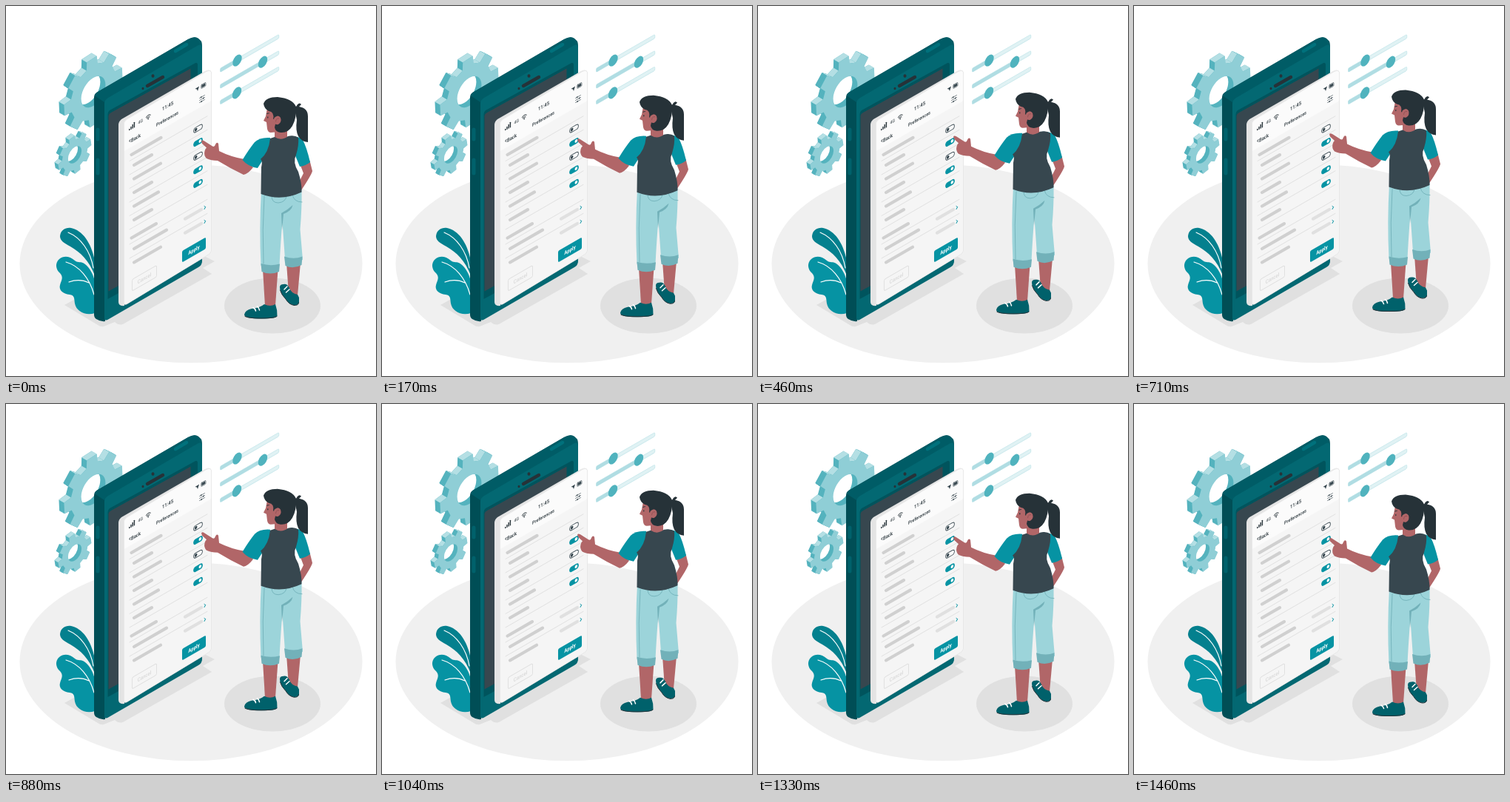
An HTML page with a canvas for the animation above (1500 ms loop, 500 px wide and 500 px high).

```html
<!DOCTYPE html>
<html lang="en">
<head>
<meta charset="utf-8">
<title>Preferences</title>
<style>
html, body { margin: 0; width: 100%; height: 100%; overflow: hidden; background: #fff; }
canvas { display: block; width: 500px; height: 500px; }
</style>
</head>
<body>
<canvas id="stage" width="500" height="500"></canvas>
<script>
const LOOP = 1500, LIFT = 10;
const TEAL = '#0693a3', DEEP = '#036872', DARK = '#37474f', INK = '#263238';
const SKIN = '#b16668', PALE = '#9cd4da', FOLD = '#72b1b9', SHOE = '#00616b';
const stage = document.getElementById('stage').getContext('2d');
const backdrop = document.createElement('canvas');
backdrop.width = backdrop.height = 500;
let ctx = backdrop.getContext('2d');

function fill(color, d) {
  ctx.fillStyle = color;
  ctx.fill(new Path2D(d));
}

function stroke(color, width, d) {
  ctx.strokeStyle = color;
  ctx.lineWidth = width;
  ctx.lineCap = ctx.lineJoin = 'round';
  ctx.stroke(new Path2D(d));
}

function oval(color, x, y, rx, ry) {
  ctx.fillStyle = color;
  ctx.beginPath();
  ctx.ellipse(x, y, rx, ry, 0, 0, 7);
  ctx.fill();
}

// Draws in the plane of the phone's front, with the origin at x, y.
function iso(x, y, draw) {
  ctx.save();
  ctx.transform(0.866, -0.5, 0, 1, x, y);
  draw();
  ctx.restore();
}

function box(x, y, w, h, r) {
  ctx.beginPath();
  ctx.roundRect(x, y, w, h, r);
}

function label(text, x, y, size, color, weight = 700) {
  iso(x, y, () => {
    ctx.font = `${weight} ${size}px Roboto, sans-serif`;
    ctx.textAlign = 'center';
    ctx.textBaseline = 'middle';
    ctx.fillStyle = color;
    ctx.fillText(text, 0, 0.4);
  });
}

// Height on the panel at x for a row that meets x = 160 at the given level.
const rowY = (x, level) => level - 0.5774 * (x - 160);

function bar(x0, x1, level, width, color) {
  stroke(color, width, `M${x0} ${rowY(x0, level)}L${x1} ${rowY(x1, level)}`);
}

function gear(x, y, radius, hole, turn, depth) {
  const points = [], root = radius * 0.77;
  for (let i = 0; i < 8; i++) {
    const mid = (turn + 45 * i) * Math.PI / 180;
    for (const [da, r] of [[-0.25, root], [-0.17, radius], [0.17, radius], [0.25, root]])
      points.push([Math.cos(mid + da) * r, Math.sin(mid + da) * r]);
  }
  const shape = new Path2D(`M${points.join('L')}Z`);
  shape.moveTo(hole, 0);
  shape.arc(0, 0, hole, 0, 7);
  const layer = (shift, color) => iso(x - shift, y - shift * 0.577, () => {
    ctx.fillStyle = color;
    ctx.fill(shape, 'evenodd');
  });
  for (let s = depth; s > 0; s -= 0.5) layer(s, '#55b3be');
  // Edges facing upwards catch the light.
  iso(x, y, () => points.forEach(([ax, ay], i) => {
    const [bx, by] = points[(i + 1) % points.length], d = depth * 1.155;
    if (bx - ax > Math.abs(by - ay))
      fill('#b4dfe4', `M${ax} ${ay}L${bx} ${by}l${-d} ${-d}L${ax - d} ${ay - d}Z`);
  }));
  layer(0, '#8fced6');
}

function drawSliders() {
  [[86, 312.5], [108, 347], [129.5, 312]].forEach(([y, knob]) => {
    const reach = (knob - 289.5) / 0.866;
    iso(289.5, y + 0.8, () => {
      box(0, -2.6, 91.5, 5.2, 1.5);
      ctx.fillStyle = '#e0f2f4';
      ctx.fill();
      ctx.strokeStyle = '#bfe4e8';
      ctx.lineWidth = 0.7;
      ctx.stroke();
      box(0, -2.6, reach, 5.2, 1.5);
      ctx.fillStyle = '#b0dde3';
      ctx.fill();
      oval('#50b3be', reach, 0, 7.2, 7.2);
    });
  });
}

function drawLeaves() {
  fill('#04808e', 'M73 311C74 302 81 299 88 300C103 303 115 319 120 344V364C112 344 101 333 87 325C78 320 73 317 73 311Z');
  fill(TEAL, 'M120 415C108 419 95 413 93 402C92 395 93 391 86 390C77 389 71 384 73 377C75 370 78 367 73 361C67 356 66 347 72 342C78 337 86 338 93 344C98 348 101 344 107 349C114 355 118 363 120 372Z');
  stroke('#fff', 1.2, 'M84 306C101 313 114 331 118 354');
  stroke('#fff', 1.2, 'M81 346C99 351 113 368 119 390M85 373C96 369 106 371 112 374');
}

function drawPhone() {
  fill('#004e56', 'M119 124Q119 119 124 116L246 45Q255 40 260 44L264 48Q265 50 265 60L134 129V426Q128 427 122 423Q119 421 119 417Z');
  fill('#005c66', 'M119.500 121Q120 118 124 116L246 45Q255 40 260 44L264 48L265 58L133 130Z');
  fill(DEEP, 'M133 132Q133 127 138 124L258 54Q265 50 265 57V345Q265 350 260 353L139 423Q133 427 133 421Z');
  stroke('#00717c', 4.5, 'M229 61L244 52');
  stroke('#00616b', 5, 'M124 167V180M124 208V226');
  fill('#00545d', 'M137.500 146Q137.500 143 140 141L256 77Q259 76 259 80V330L137.500 396Z');
  fill(DARK, 'M138.500 150Q138 146 142 144L249.500 84.500V325L138.500 385.500Z');
  stroke(INK, 4.4, 'M191 108L212 96');
  oval(INK, 198.5, 94.5, 2, 2.3);
  oval(INK, 185, 111.5, 1.5, 1.8);
}

function drawStatus() {
  for (let i = 0; i < 4; i++) {
    const x = 166.8 + i * 2.2, base = rowY(x, 171.5);
    stroke(INK, 1.4, `M${x} ${base}V${base - 1 - i * 1.8}`);
  }
  label('4G', 181.7, 156, 6, INK, 400);
  iso(192.3, 151, () => {
    stroke(INK, 0.9, 'M-3.500 -2Q0 -5 3.500 -2M-2 0Q0 -2 2 0');
    oval(INK, 0, 1.5, 0.9, 0.9);
  });
  label('11:45', 218.5, 135, 6.8, INK, 500);
  fill(DARK, 'M255.500 112L261 108.500L259 115L258 112.500Z');
  iso(267, 107.300, () => {
    ctx.strokeStyle = DARK;
    ctx.lineWidth = 0.6;
    box(-3.8, -2.5, 7.2, 5, 1);
    ctx.stroke();
    ctx.fillStyle = DARK;
    ctx.fillRect(-3, -1.7, 5.5, 3.4);
  });
  iso(265, 125.5, () => {
    stroke(DARK, 0.6, 'M-4 -3H4M-4 0H4M-4 3H4');
    for (const [x, y] of [[-1.5, -3], [2, 0], [-1, 3]]) oval(DARK, x, y, 1, 1);
  });
  label('Preferences', 218, 152.300, 6.4, INK, 500);
  label('Back', 175.500, 178, 6.8, INK, 500);
  stroke(INK, 0.8, 'M168 180.500L166.600 182.800L168 183.200');
}

function drawToggle(y, on) {
  iso(259.5, y, () => {
    box(-6.8, -3.2, 13.6, 6.4, 3.2);
    ctx.fillStyle = on ? TEAL : '#fafafa';
    ctx.fill();
    ctx.strokeStyle = on ? TEAL : DARK;
    ctx.lineWidth = 0.9;
    ctx.stroke();
    oval(on ? '#fff' : DARK, on ? 3.3 : -3.3, 0, 2.1, 2.1);
  });
}

function drawButton(text, x, y, w, color, textColor, solid) {
  iso(x, y, () => {
    box(-w / 2, -7.7, w, 15.4, 2);
    ctx.fillStyle = ctx.strokeStyle = color;
    ctx.lineWidth = 1;
    solid ? ctx.fill() : ctx.stroke();
  });
  label(text, x, y, 7, textColor, solid ? 700 : 500);
}

function drawPanel() {
  fill('#e4e4e4', 'M152 161Q152 156 156 153L269 88Q274 85 277 88L160 158V405Q152 406 152 400Z');
  const front = new Path2D('M159 160Q159 156 163 153L271 88Q278 85 278 92V329Q278 333 274 336L165 402Q159 406 159 400Z');
  ctx.fillStyle = '#f5f5f5';
  ctx.fill(front);
  ctx.save();
  ctx.clip(front);
  fill('#fbfbfb', `M159 140V${rowY(159, 196)}L279 ${rowY(279, 196)}V80Z`);
  ctx.strokeStyle = '#e3e3e3';
  ctx.lineWidth = 1.4;
  ctx.stroke(front);
  ctx.restore();
  drawStatus();

  for (const level of [213.5, 232, 250.5, 269, 287.5, 306, 326, 345])
    bar(167, 272, level, 0.9, '#dedede');
  bar(169.5, 209.5, 206.5, 4.2, '#d0d0d0');
  bar(169.5, 203, 319, 4.2, '#d0d0d0');
  [[197, 222.5], [209, 241], [197, 259.5], [206, 278], [197, 296.5], [217, 335.5], [209, 354]]
    .forEach(([end, level]) => bar(173, end, level, 4.2, '#d0d0d0'));
  [0, 1, 0, 1, 1].forEach((on, i) => drawToggle(165.5 + i * 18.6, on));
  for (const level of [335, 354]) {
    bar(242, 264, level, 4.2, '#e0e0e0');
    const y = rowY(269, level);
    stroke(TEAL, 1, `M268 ${y - 1.5}L269.700 ${y - 0.5}L268 ${y + 2.5}`);
  }
  drawButton('Apply', 254, 329.5, 37, TEAL, '#fff', true);
  drawButton('Cancel', 187, 367.800, 38, '#dedede', '#d8d8d8', false);
}

function drawBackdrop() {
  ctx.fillStyle = '#fff';
  ctx.fillRect(0, 0, 500, 500);
  oval('#f0f0f0', 250, 348.3, 231.5, 134);
  fill('#e0e0e0', 'M79 404L119 382L264 310V336L282 345L266 354L278 362L158 430Q152 432 147 427L132 433Q128 434 124 431Z');
  oval('#e0e0e0', 360, 405, 65, 37.5);
  drawSliders();
  gear(118, 116, 46, 19, -3, 7);
  gear(93, 201, 26, 10.5, -10, 5);
  drawLeaves();
  drawPhone();
  drawPanel();
}

function drawLegs() {
  fill(SKIN, 'M379 347H398L394 391Q388 395 382 389Z');
  fill(SHOE, 'M370 380Q370 376 375 376Q380 375 383 381Q385 388 394 390L396 394V401Q395 405 388 404Q382 403 378 396Q370 388 370 380Z');
  stroke(INK, 1, 'M370.500 384Q372 390 378 396Q382 403 389 404.500Q395 405 395.500 401');
  stroke('#fff', 1.5, 'M376 383L380 379M378.500 387L383 383');
  fill(SKIN, 'M347 356H367.500L364 405Q357 409 350 405Z');
  fill(SHOE, 'M322 417Q323 411 332 409Q343 408 349 403Q357 407 364 403Q367 411 366.500 419Q365 422.500 345 422.500Q322 422.500 322 417Z');
  stroke(INK, 1, 'M323 419.500Q327 422 345 422Q363 422 366 419.500');
  stroke('#fff', 1.6, 'M334 407.500Q337 409 337.500 412M339.500 406Q342 407.500 342.500 411');
  fill(PALE, 'M370 252L399.500 248Q400 273 397.500 302L401 343Q389 347 377 342L373 285Z');
  fill(PALE, 'M345 250Q372 261 393 254Q389 269 375 278Q372 302 369.500 351Q357 355 344.500 351Q342 300 345 250Z');
  fill(FOLD, 'M372 280Q380 276 387.500 269Q386 277 375 281L373 303Z');
  stroke(FOLD, 0.9, 'M349 257Q346 302 348 348M359 257Q359 266 368 266Q378 265 379 257M387 255Q389 265 400 265');
  fill(FOLD, 'M376 338.500Q389 343 400.500 338.500L399.500 350Q388 356 377.500 351Z');
  fill(FOLD, 'M344.500 348Q357 352 370 348.500L369 359Q357 364 345.500 359Z');
}

function drawTorso() {
  fill(SKIN, 'M397 213L410.500 209L414 223Q413 228 399 249L394 242L402 226Z');
  fill(TEAL, 'M384 176Q397 176 401 181Q406 190 411 211Q405 216 397 217L388 195Z');
  fill(SKIN, 'M264 183Q265 180.500 268 182.500L279 189.500Q282 191 283 187Q285 183 287 186L288 196Q304 204 322 207L334 218Q327 227 321 228Q304 220 286 209Q277 209 271 206Q267 202 268.500 196Q269 193 271 191.500L265 186Z');
  fill(TEAL, 'M357 178Q343 177 336 184Q328 194 319.500 208Q327 217 340 219Q348 207 357 192Z');
  fill(SKIN, 'M363 163H380V178Q372 184 363 179Z');
  fill(DARK, 'M357 179L363 177Q372 183 381 176Q390 174 395 178Q396 188 392 201Q387 211 395 224Q400 240 399.500 251.500Q372 264.500 344.500 254L345 218Q347 209 344 207Q355 198 357 179Z');
}

function drawHead() {
  fill(SKIN, 'M353 138L351 149L348 155L352 157L353 166Q354 171 358 171L369 170L377 158V140Z');
  fill(INK, 'M348 132Q351 123 367 123Q387 125 392 136Q393 151 387 162Q381 172 371 171Q364 170 363 164L366 151L361 153Q363 143 355 142Q349 139 348 132Z');
  fill(INK, 'M390 139L394 133Q397 130 399 133L396 136Q408 138 408 149V184Q399 183 395 176Q391 168 393 154Z');
  fill(SKIN, 'M362.500 151Q368 146 371 151Q373 157 368 160Q363 161 362 156Z');
  stroke('#8f4f52', 0.8, 'M364.500 156Q365 151 369 152');
  stroke(INK, 0.9, 'M352.500 145.500L355.500 144.800');
  oval(INK, 353.8, 150.5, 0.6, 1.2);
}

function tick(now) {
  const phase = now % LOOP / LOOP;
  const lift = LIFT * (1 - Math.abs(1 - 2 * phase));
  ctx.drawImage(backdrop, 0, 0);
  ctx.save();
  ctx.translate(0, -lift);
  drawLegs();
  drawTorso();
  drawHead();
  ctx.restore();
}

let start;
function play(now) {
  start ??= now;
  tick(now - start);
  requestAnimationFrame(play);
}

drawBackdrop();
ctx = stage;
tick(0);
requestAnimationFrame(play);
</script>
</body>
</html>
```
